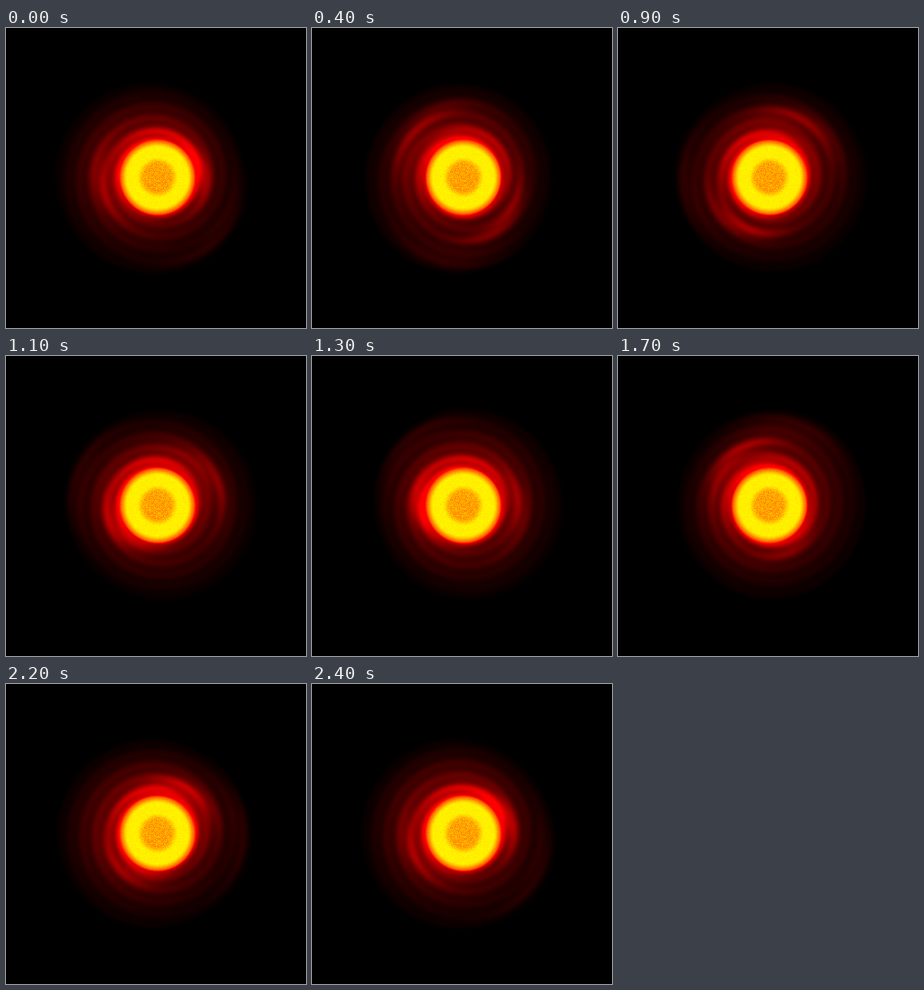
An HTML page with a canvas that plays this animation: 300x300 px, repeating every 2.5 s.

```html
<!DOCTYPE html>
<html lang="en">
<head>
<meta charset="utf-8">
<title>Rotating disk</title>
<style>
html, body { margin: 0; width: 100%; height: 100%; overflow: hidden; background: #000; }
canvas { display: block; }
</style>
</head>
<body>
<canvas width="300" height="300"></canvas>
<script>
const SIZE = 300, LOOP = 2500, STEP = 100, CX = 151.5, CY = 149.5, CORE = 37;
const TURN = 2 * Math.PI, UP = -TURN / 4, UPPER_LEFT = -TURN / 3;
const { sin, cos, exp } = Math;
const ctx = document.querySelector('canvas').getContext('2d');
const image = ctx.createImageData(SIZE, SIZE);

const hash = (x, y) => {
  const s = sin(x * 12.99 + y * 78.23) * 43758.55;
  return s - Math.floor(s);
};
const smooth = (a, b, v) => {
  const k = Math.min(1, Math.max(0, (v - a) / (b - a)));
  return k * k * (3 - 2 * k);
};
const bell = (v, width) => exp(-((v / width) ** 2));

// Two opposite arms breathe in and out while they circle; a faint one trails outside
function armsAt(spin) {
  return [
    { angle: spin - .15, r: 56 - 10 * cos(2 * spin), amp: .34, width: 7 },
    { angle: spin - .15 + TURN / 2, r: 58 + 12 * sin(spin), amp: .26, width: 8 },
    { angle: spin + .75, r: 84, amp: .12, width: 10 }
  ];
}

// Heat level: 0 black, 1 red, 2 yellow
function coreHeat(r, x, y) {
  const grain = hash(x, y) - .5;
  const inner = 1.63 + .07 * cos(r * 1.7) * exp(-r / 6) + .2 * grain;
  const ring = 1.94 + .06 * grain;
  return inner + (ring - inner) * smooth(13, 21, r) - .6 * smooth(30, CORE + 1, r);
}

function diskHeat(r, angle, spin, arms) {
  const reach = r + (1 + 7 * cos(spin)) * cos(angle) * smooth(45, 90, r);
  let heat = .42 * (1 - smooth(30, 98, reach)) * (1 + .25 * cos(angle - UPPER_LEFT));
  heat += .05 * (1 - smooth(90, 100, reach));
  heat += .5 * bell(r - CORE, 5);
  heat += .13 * (1 + cos(angle - UP)) * bell(r - 46, 5);
  for (const arm of arms) {
    let turn = angle - arm.angle;
    turn -= TURN * Math.round(turn / TURN);
    heat += arm.amp * bell(r - arm.r - 4 * turn, arm.width) * bell(turn, .75);
  }
  const ripple = sin(r * .5 + 2 * (angle - spin));
  return heat * (1 + .12 * ripple) - .02;
}

function draw(t) {
  const spin = TURN * t / LOOP, arms = armsAt(spin), px = image.data;
  for (let y = 0, p = 0; y < SIZE; y++) {
    for (let x = 0; x < SIZE; x++, p += 4) {
      const ox = x + .5 - CX, oy = y + .5 - CY, r = Math.hypot(ox, oy);
      let heat = 0;
      if (r < 115) {
        const edge = smooth(CORE - 1, CORE + 2, r);
        if (edge < 1) heat += (1 - edge) * coreHeat(r, x, y);
        if (edge > 0) heat += edge * Math.min(1, diskHeat(r, Math.atan2(oy, ox), spin, arms));
      }
      px[p] = 255 * heat;
      px[p + 1] = 255 * (heat - 1);
      px[p + 2] = 0;
      px[p + 3] = 255;
    }
  }
  ctx.putImageData(image, 0, 0);
}

const start = performance.now();
let shown = -1;
function tick() {
  const t = Math.floor((performance.now() - start) % LOOP / STEP) * STEP;
  if (t !== shown) draw(shown = t);
  requestAnimationFrame(tick);
}
tick();
</script>
</body>
</html>
```
